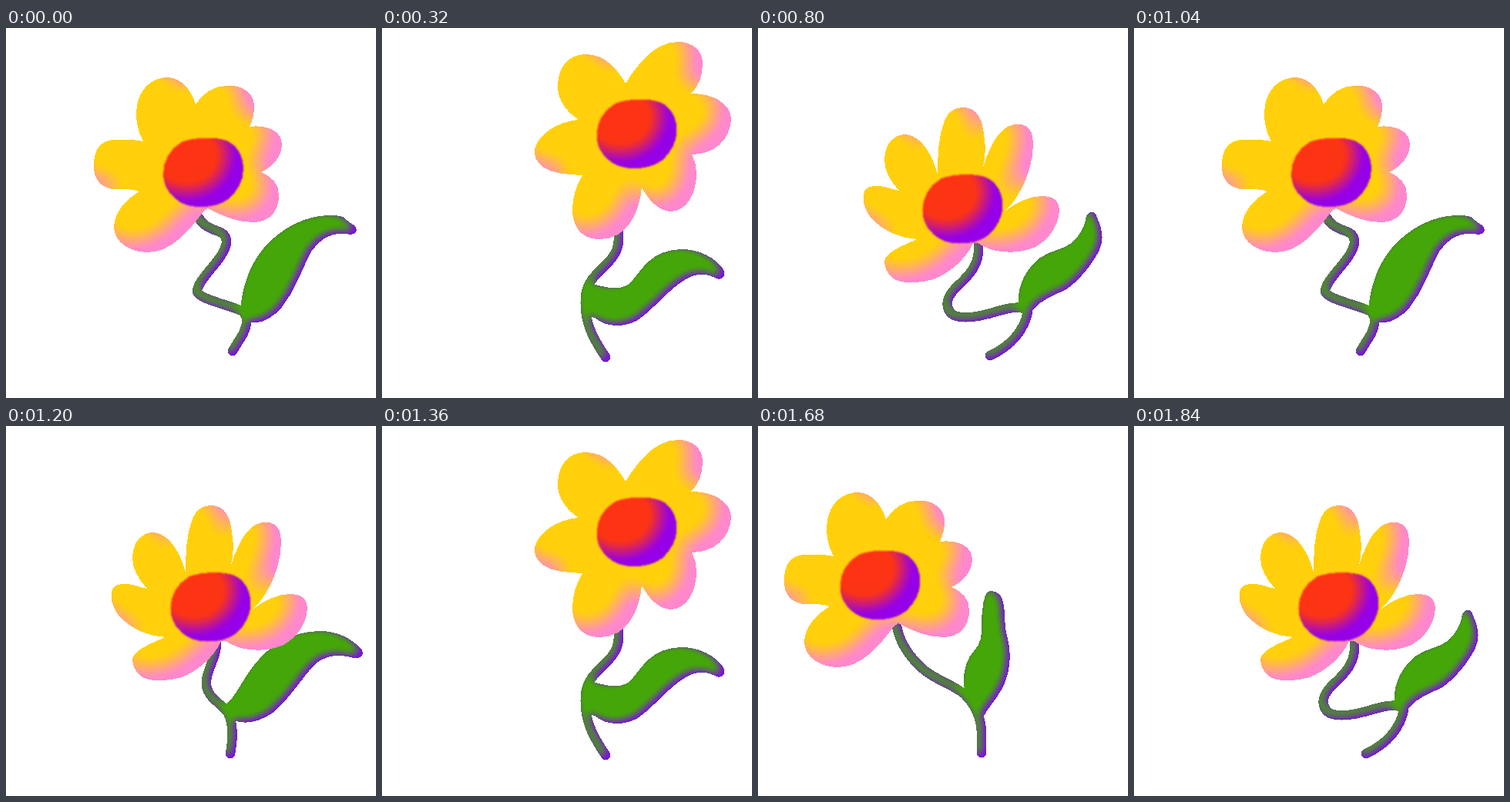
Recreate the animation shown at these times as an HTML page. Size 480 px wide and 480 px high, loop 1920 ms.

```html
<!DOCTYPE html>
<html lang="en">
<head>
<meta charset="utf-8">
<title>Dancing flower</title>
<style>
  html, body { margin: 0; width: 100%; height: 100%; overflow: hidden; background: #fff; }
  svg { display: block; width: 100vw; height: 100vh; }
  .stem { fill: none; stroke: #44a608; stroke-width: 12.5; stroke-linecap: round; stroke-linejoin: round; }
  .leaf { fill: #44a608; }
  .petals { fill: #ffd00b; }
  .disc { fill: #fc3414; }
  .soft { filter: url(#red) blur(1px); }
</style>
</head>
<body>
<svg id="stage" viewBox="0 0 480 480" shape-rendering="crispEdges"></svg>
<script>
const STEP = 160;

const DISC = 'M-52 2C-52-14-44-30-28-39C-14-45 16-47 32-40C46-33 52-18 52-4C52 12 44 24 34 34' +
  'C22 43 10 45-4 45C-18 45-28 42-38 33C-48 24-52 14-52 2Z';

const HEADS = {
  open: 'M178 147C170 132 167 115 170 100C174 78 190 64 210 64C228 65 240 80 246 99' +
    'C256 84 270 75 285 75C306 73 322 84 322 102C322 113 319 121 316 128' +
    'C340 125 358 134 358 152C357 169 344 181 331 187' +
    'C346 193 354 203 354 217C354 238 342 252 320 252C300 252 280 244 262 234' +
    'L256 238C236 266 212 292 182 291C158 290 140 276 140 258C141 238 156 222 173 212' +
    'C165 209 155 209 145 209C126 210 113 198 114 178C114 158 122 146 140 145C155 144 168 145 178 147Z',
  high: 'M255 119C238 108 228 92 228 76C228 50 242 34 265 34C290 35 304 52 316 72' +
    'C332 46 354 18 384 18C404 18 416 30 416 46C416 64 410 76 401 85' +
    'C430 85 452 98 453 118C452 146 430 164 402 164' +
    'C406 172 408 180 408 188C408 214 396 238 374 238C358 237 345 222 337 207' +
    'C334 240 318 275 281 274C258 274 247 256 247 236C247 220 252 204 260 191' +
    'C240 190 222 189 210 181C200 174 197 166 198 158C202 138 228 121 255 119Z',
  tilted: 'M166 214C150 208 142 198 142 183C142 164 156 151 180 151C202 150 222 161 240 170' +
    'C258 138 284 111 316 111C340 111 356 128 356 146C354 164 340 180 326 190' +
    'C350 191 366 193 374 199C382 206 383 216 383 228C383 248 374 258 358 258C345 259 333 257 321 257' +
    'C326 268 328 280 327 292C325 318 310 338 288 338C270 337 260 322 252 304' +
    'C242 318 230 329 206 329C184 328 174 316 174 300C174 290 178 281 183 273' +
    'C172 274 162 275 154 273C142 270 138 262 138 250C139 232 150 220 166 214Z',
  raised: 'M183 211C170 196 164 185 164 170C165 150 176 138 192 138C212 140 226 164 233 190' +
    'C233 165 234 140 242 120C248 107 256 103 266 103C284 103 291 118 293 138C296 154 295 168 292 180' +
    'C298 162 308 136 324 128C336 122 350 124 355 136C361 158 352 190 342 208C335 222 328 230 321 237' +
    'C336 226 354 217 372 218C385 219 391 226 391 236C390 258 376 276 358 285C340 292 322 292 304 288' +
    'C298 286 290 282 285 279L279 279C270 300 248 318 228 326C208 332 184 332 174 324' +
    'C164 314 162 303 166 297C175 286 192 281 206 274' +
    'C186 273 164 264 150 250C138 238 134 222 138 212C142 204 154 204 164 206C172 208 178 210 183 211Z'
};

const POSES = [
  { head: 'open', disc: [256, 187],
    stem: 'M250 246C262 268 286 258 286 278C284 300 248 325 248 342C252 352 285 358 306 367C316 376 312 386 308 396L294 419',
    leaf: 'M304 366C306 340 314 310 334 286C356 260 388 243 420 243C432 243 438 244 440 248C448 254 455 257 455 262' +
      'C454 269 446 268 440 267C424 265 408 272 396 290C384 312 376 340 358 362C346 376 332 384 318 382C312 384 304 376 304 366Z' },
  { head: 'raised', disc: [265.5, 234.5],
    stem: 'M272 276C276 296 262 312 260 330C258 352 278 358 288 372C296 390 294 408 291 425',
    leaf: 'M284 362C298 352 306 330 322 310C342 284 372 266 408 266C430 266 448 276 460 288C467 296 460 303 451 301' +
      'C434 296 418 296 402 308C384 326 370 352 346 372C326 386 306 388 292 380C284 376 282 370 284 362Z' },
  { head: 'high', disc: [330.5, 137],
    stem: 'M307 262C307 275 308 285 300 296C288 314 266 322 264 350C262 380 272 400 290 427',
    leaf: 'M262 334C270 330 280 334 290 336C304 339 314 337 322 331C338 312 350 288 388 287C412 287 432 298 442 312' +
      'C448 320 442 328 434 325C424 320 412 316 396 325C374 336 350 368 330 380C312 389 290 388 276 376' +
      'C266 374 258 368 258 350C258 342 259 338 262 334Z' },
  { head: 'tilted', disc: [265.5, 234.5],
    stem: 'M264 326C260 340 260 360 266 374C274 388 290 392 296 402C294 415 293 422 293 430',
    leaf: 'M277 378C284 352 304 336 330 330C350 326 362 325 372 318C386 306 388 290 394 276C398 267 406 267 409 276' +
      'C416 290 415 306 405 322C393 344 370 358 346 369C326 379 306 386 301 400C298 410 292 410 288 402C280 394 276 388 277 378Z' },
  { head: 'open', shift: [-80, 22], disc: [158.5, 206],
    stem: 'M180 260C184 280 196 300 216 317C232 330 254 336 268 348C282 362 290 380 290 400L290 424',
    leaf: 'M268 342C264 324 270 302 280 292C292 280 290 264 290 250C292 232 292 222 298 215C308 212 316 218 318 228' +
      'C322 245 318 258 324 276C330 300 326 324 316 342C308 356 298 366 292 378L284 376C276 362 268 350 268 342Z' },
  { head: 'raised', disc: [265.5, 234.5],
    stem: 'M286 281C288 305 276 318 264 330C248 344 240 356 250 370C262 380 290 374 312 367C330 362 345 360 350 368C346 390 330 412 301 425',
    leaf: 'M338 358C336 334 348 312 366 298C380 288 396 288 408 278C420 266 424 256 426 244C430 236 438 237 440 246' +
      'C447 262 449 274 443 288C433 308 415 329 400 339C384 347 366 353 356 366C348 376 334 370 338 358Z' }
];

// Sprayed shading: the base colour fades to an edge colour at the lower right.
const shade = (id, edge, dx, dy, blur, grain, slope, intercept) => `
  <filter id="${id}" filterUnits="userSpaceOnUse" x="0" y="0" width="480" height="480" color-interpolation-filters="sRGB">
    <feFlood flood-color="${edge}"/>
    <feComposite in2="SourceAlpha" operator="in" result="edge"/>
    <feTurbulence type="fractalNoise" baseFrequency="0.8" result="noise"/>
    <feGaussianBlur in="SourceAlpha" stdDeviation="${blur}"/>
    <feOffset dx="${dx}" dy="${dy}"/>
    <feComponentTransfer><feFuncA type="linear" slope="${slope}" intercept="${intercept}"/></feComponentTransfer>
    <feDisplacementMap in2="noise" scale="${grain}" xChannelSelector="R" yChannelSelector="G" result="light"/>
    <feComposite in="SourceGraphic" in2="light" operator="in" result="base"/>
    <feMerge><feMergeNode in="edge"/><feMergeNode in="base"/></feMerge>
  </filter>`;

const drawPose = ({ head, shift = [0, 0], disc, stem, leaf }) => `
  <g class="pose" display="none">
    <g filter="url(#green)"><path class="stem" d="${stem}"/><path class="leaf" d="${leaf}"/></g>
    <g filter="url(#yellow)"><path class="petals" d="${HEADS[head]}" transform="translate(${shift})"/></g>
    <g class="soft"><path class="disc" d="${DISC}" transform="translate(${disc})"/></g>
  </g>`;

const stage = document.getElementById('stage');
stage.innerHTML = '<defs>' +
  shade('green', '#7a14d8', -4, -3, 6, 6, 1.4, -0.3) +
  shade('yellow', '#ff88cc', -19, -15, 15, 12, 1.5, -0.25) +
  shade('red', '#9600e8', -20, -18, 14, 12, 1.5, -0.25) +
  '</defs>' + POSES.map(drawPose).join('');
const poses = [...stage.querySelectorAll('.pose')];

function render(now) {
  const current = Math.floor(now / STEP) % poses.length;
  poses.forEach((pose, i) => pose.setAttribute('display', i === current ? 'inline' : 'none'));
  requestAnimationFrame(render);
}
render(0);
</script>
</body>
</html>
```
